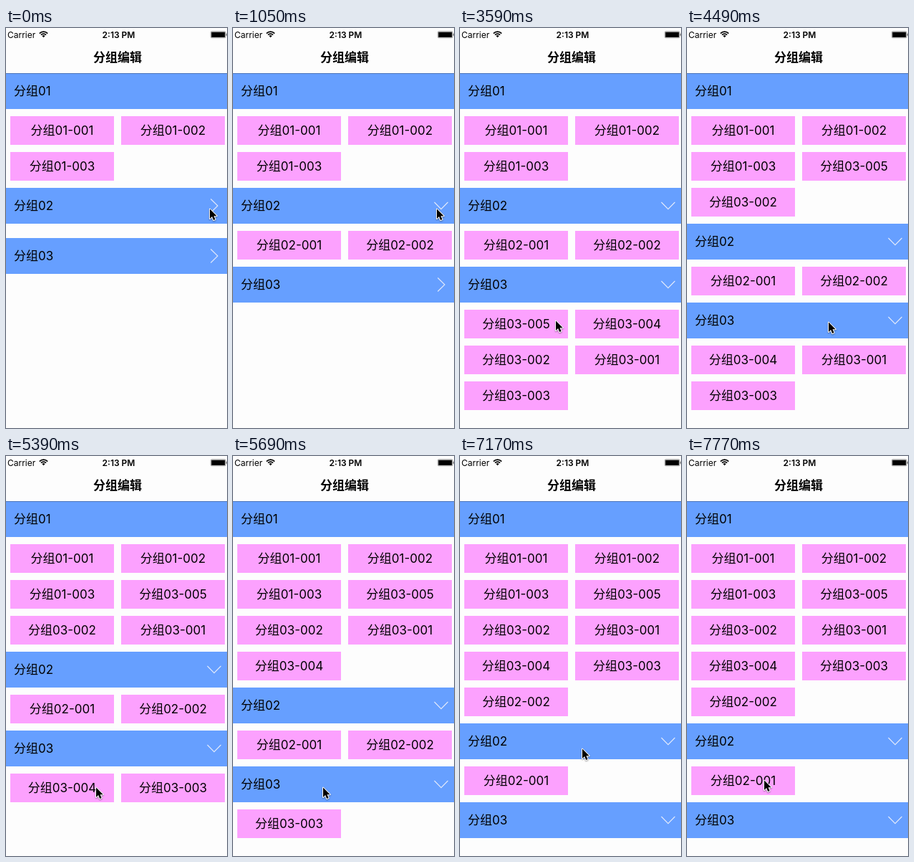
Recreate the animation shown at these times as an HTML page with a canvas. Size 309 px wide and 558 px high, loop 8000 ms.

```html
<!DOCTYPE html>
<html lang="zh-CN">
<head>
<meta charset="utf-8">
<title>分组编辑</title>
<style>
html, body { margin: 0; width: 100%; height: 100%; overflow: hidden; background: #fdfdfd; }
canvas { display: block; width: 309px; height: 558px; }
</style>
</head>
<body>
<canvas id="stage"></canvas>
<script>
const W = 309, H = 558, LOOP = 8000, STEP = 145;
const FONT = 'Inter, "Noto Sans CJK SC", "Noto Sans CJK", sans-serif';
const BLUE = '#669fff', PINK = '#fca1fe', PAPER = '#fdfdfd', CHEVRON = '#e3eafb';

const canvas = document.getElementById('stage');
const ctx = canvas.getContext('2d');
const ratio = window.devicePixelRatio || 1;
canvas.width = W * ratio;
canvas.height = H * ratio;

const GROUPS = [
  { name: '01', items: ['01-001', '01-002', '01-003'], opens: 0 },
  { name: '02', items: ['02-001', '02-002'], opens: 1050 },
  { name: '03', items: ['03-005', '03-004', '03-002', '03-001', '03-003'], opens: 2390 }
];

// Taps that send an item to the first group: [time, item]
const TAPS = [
  [3890, '03-005'], [4490, '03-002'], [4940, '03-001'],
  [5690, '03-004'], [6430, '03-003'], [7020, '02-002']
];

// Pointer moves: [start, steps, x, y]
const START = [284, 251];
const MOVES = [
  [1500, 5, 284, 349], [2990, 5, 133, 407], [4040, 2, 197, 409],
  [4640, 2, 203, 456], [5090, 3, 125, 461], [5840, 3, 124, 497],
  [6580, 3, 190, 400], [7170, 3, 113, 426], [7620, 2, 107, 451]
];

function pointerAt(t) {
  let [x, y] = START;
  for (const [start, steps, tx, ty] of MOVES) {
    if (t < start) break;
    const p = Math.min(1, (Math.floor((t - start) / STEP) + 1) / steps);
    const e = p * p * (3 - 2 * p);
    x += (tx - x) * e;
    y += (ty - y) * e;
  }
  return [Math.round(x), Math.round(y)];
}

function groupsAt(t) {
  const moved = TAPS.filter(([time]) => t >= time).map(([, item]) => item);
  return GROUPS.map((g, i) => ({
    name: g.name,
    open: t >= g.opens,
    items: i ? g.items.filter(item => !moved.includes(item)) : g.items.concat(moved)
  }));
}

function rect(x, y, w, h, color) {
  ctx.fillStyle = color;
  ctx.fillRect(x, y, w, h);
}

function text(str, x, y, size, weight = 400, align = 'left') {
  ctx.font = `${weight} ${size}px ${FONT}`;
  ctx.textAlign = align;
  ctx.fillStyle = '#000';
  ctx.fillText(str, x, y);
}

function path(points, close) {
  ctx.beginPath();
  points.forEach(([x, y]) => ctx.lineTo(x, y));
  if (close) ctx.closePath();
}

function drawWifi() {
  const cx = 52.5, cy = 13.2, a = -Math.PI * 3 / 4, b = -Math.PI / 4;
  ctx.strokeStyle = ctx.fillStyle = '#000';
  ctx.lineWidth = 1.7;
  for (const r of [5, 8]) {
    ctx.beginPath();
    ctx.arc(cx, cy, r, a, b);
    ctx.stroke();
  }
  ctx.beginPath();
  ctx.moveTo(cx, cy);
  ctx.arc(cx, cy, 3, a, b);
  ctx.fill();
}

function drawBattery() {
  ctx.strokeStyle = '#777';
  ctx.lineWidth = 0.7;
  ctx.beginPath();
  ctx.roundRect(286.3, 4.8, 20.8, 9, 1.5);
  ctx.stroke();
  rect(287.2, 5.7, 19, 7.2, '#000');
  rect(307.6, 7.8, 1, 3, '#555');
}

function drawBar() {
  text('Carrier', 2, 14, 12);
  drawWifi();
  text('2:13 PM', 157.5, 14, 12, 600, 'center');
  drawBattery();
  text('分组编辑', 156, 47, 17, 600, 'center');
}

function drawChevron(y, open) {
  path(open
    ? [[281.5, y - 5], [291, y + 4.7], [300.5, y - 5]]
    : [[286.3, y - 9.5], [296, y], [286.3, y + 9.5]]);
  ctx.strokeStyle = CHEVRON;
  ctx.lineWidth = 1.1;
  ctx.stroke();
}

function drawGroups(groups) {
  let y = 63;
  groups.forEach((g, i) => {
    rect(0, y, W, 50, BLUE);
    text('分组' + g.name, 11, y + 31, 17);
    if (i) drawChevron(y + 25, g.open);
    y += 50;
    const items = g.open ? g.items : [];
    items.forEach((item, n) => {
      const x = n % 2 ? 161 : 6;
      const top = y + 10 + 50 * Math.floor(n / 2);
      rect(x, top, 145, 40, PINK);
      text('分组' + item, x + 72.5, top + 26, 17, 400, 'center');
    });
    y += items.length ? 10 + 50 * Math.ceil(items.length / 2) : 20;
  });
  rect(0, 63, W, 1, '#4a74bb');
}

function drawPointer([x, y]) {
  ctx.save();
  ctx.translate(x + 1, y + 1.6);
  path([[0, 0], [0, 13.4], [3.1, 10.5], [5.2, 15.4], [7.6, 14.4], [5.5, 9.6], [9.7, 9.6]], true);
  ctx.lineJoin = 'round';
  ctx.strokeStyle = '#fff';
  ctx.lineWidth = 2;
  ctx.shadowColor = 'rgba(0,0,0,0.4)';
  ctx.shadowBlur = 2 * ratio;
  ctx.shadowOffsetY = ratio;
  ctx.stroke();
  ctx.shadowColor = 'transparent';
  ctx.fillStyle = '#000';
  ctx.fill();
  ctx.restore();
}

function draw(t) {
  ctx.setTransform(ratio, 0, 0, ratio, 0, 0);
  rect(0, 0, W, H, PAPER);
  drawBar();
  drawGroups(groupsAt(t));
  drawPointer(pointerAt(t));
}

const begin = performance.now();
function tick() {
  draw((performance.now() - begin) % LOOP);
  requestAnimationFrame(tick);
}
tick();
</script>
</body>
</html>
```
